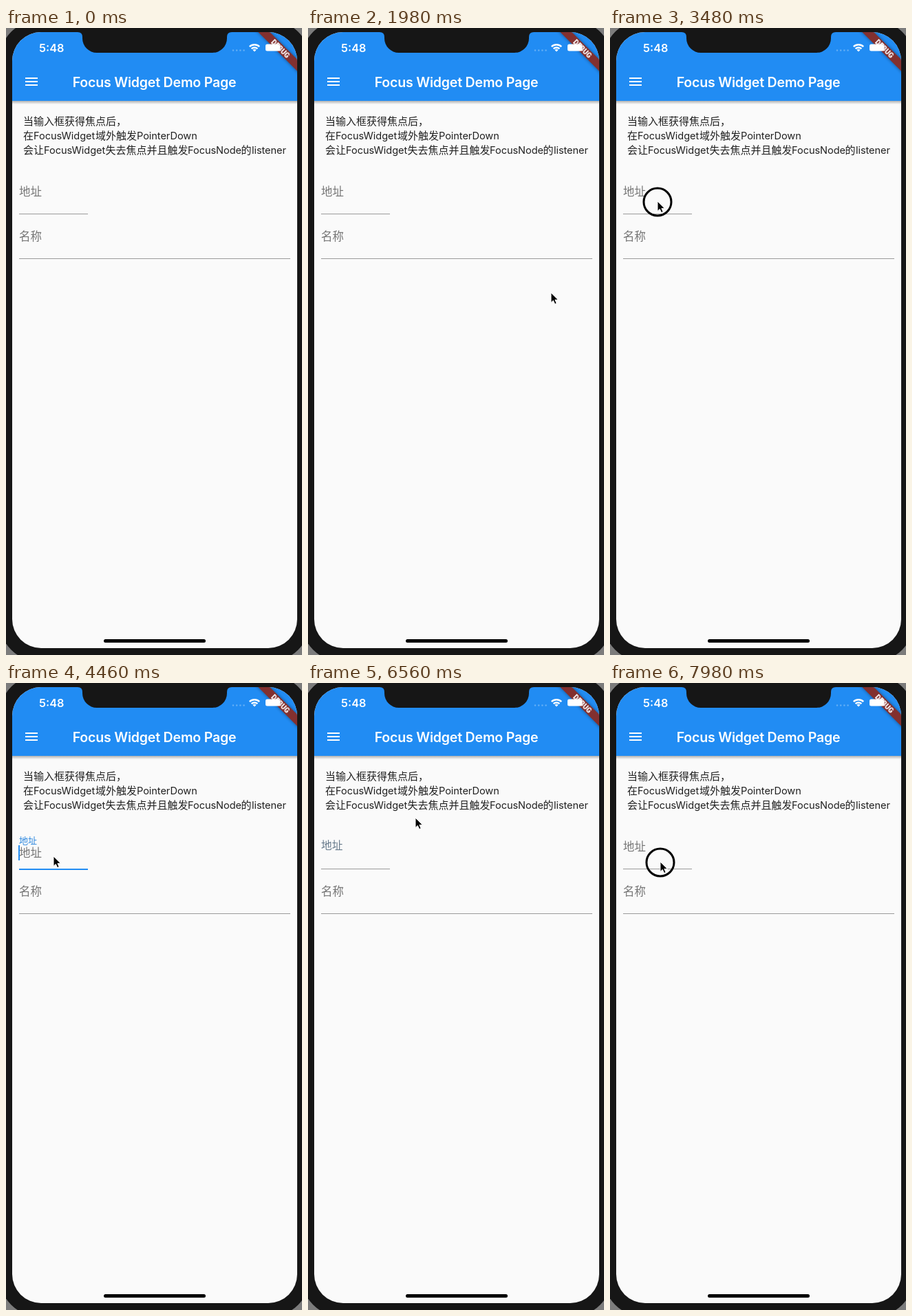
Animation of 430 by 912 pixels, one loop 8000 ms. Source, as an HTML page:

```html
<!DOCTYPE html>
<html lang="zh-CN">
<head>
<meta charset="utf-8">
<title>Focus Widget Demo</title>
<style>
  html, body { margin: 0; width: 100%; height: 100%; overflow: hidden; background: #7c7c7c; }
  svg { display: block; width: 100%; height: 100%; }
  text { font: 15px "Noto Sans CJK SC", "Noto Sans CJK", sans-serif; fill: #212121; }
  .latin { font: 14.6px Inter, sans-serif; letter-spacing: -.08px; }
  .title { font: 600 19.6px Inter, sans-serif; letter-spacing: -.23px; fill: #fff; }
  .clock { font: 600 16.3px Inter, sans-serif; fill: #fff; }
  .debug { font: 900 10px Roboto, sans-serif; fill: #fff; letter-spacing: .2px; }
  .field { font-size: 16.5px; fill: #757575; }
  #caret, #hint, #focusLine, #ring { opacity: 0; }
</style>
</head>
<body>
<svg viewBox="0 0 430 912">
  <defs>
    <clipPath id="screen"><rect x="9" y="6" width="414" height="896" rx="42"/></clipPath>
    <linearGradient id="shade" x2="0" y2="1">
      <stop stop-color="#444" stop-opacity=".4"/>
      <stop offset="1" stop-color="#444" stop-opacity="0"/>
    </linearGradient>
    <filter id="blur" x="-20%" y="-80%" width="140%" height="260%"><feGaussianBlur stdDeviation="2.5"/></filter>
  </defs>

  <rect x="-10" y="-12" width="452" height="934" rx="60" fill="#161616"/>

  <g clip-path="url(#screen)">
    <path fill="#fafafa" d="M9 6H423V902H9Z"/>
    <path fill="url(#shade)" d="M9 106H423V111H9Z"/>
    <path fill="#218cf3" d="M9 6H423V106H9Z"/>

    <path stroke="#fff" stroke-width="2" d="M28 73H46M28 78H46M28 83H46"/>
    <text class="title" x="215.5" y="85.5" text-anchor="middle">Focus Widget Demo Page</text>

    <text x="25" y="140.5">当输入框获得焦点后，</text>
    <text y="161.5"><tspan x="25">在</tspan><tspan class="latin" x="40">FocusWidget</tspan><tspan x="130">域外触发</tspan><tspan class="latin" x="190">PointerDown</tspan></text>
    <text y="182.5"><tspan x="25">会让</tspan><tspan class="latin" x="55">FocusWidget</tspan><tspan x="144.5">失去焦点并且触发</tspan><tspan class="latin" x="264">FocusNode</tspan><tspan x="341.5">的</tspan><tspan class="latin" x="357">listener</tspan></text>

    <path id="idleLine" stroke="#9a9a9a" d="M19 270.5H119"/>
    <path id="focusLine" stroke="#218cf3" stroke-width="2" d="M19 271H119"/>
    <text id="hint" class="field" x="19" y="253.3">地址</text>
    <text id="label" class="field">地址</text>
    <path id="caret" stroke="#218cf3" stroke-width="2" d="M19 236V258"/>

    <text class="field" x="19" y="309.3">名称</text>
    <path stroke="#9a9a9a" d="M19 335.5H413"/>

    <g transform="translate(423 6) rotate(45)">
      <rect x="-48" y="28" width="96" height="12" fill="#000" opacity=".45" filter="url(#blur)"/>
      <rect x="-48" y="28" width="96" height="12" fill="#82302f"/>
      <text class="debug" y="37.6" text-anchor="middle">DEBUG</text>
    </g>

    <text class="clock" x="48" y="34.6">5:48</text>
    <path stroke="#62aef6" stroke-width="2.6" stroke-linecap="round" stroke-dasharray="0 5.2" d="M330 32.5H347"/>
    <g fill="none" stroke="#fff" stroke-width="2.4">
      <path d="M353.8 27.2A10.4 10.4 0 0 1 368.2 27.2"/>
      <path d="M356.6 30.2A6.4 6.4 0 0 1 365.4 30.2"/>
      <path fill="#fff" stroke="none" d="M358.4 31.8A3.9 3.9 0 0 1 363.6 31.8L361 34.6Z"/>
    </g>
    <rect x="377" y="23.5" width="21" height="10" rx="2.5" fill="#fff"/>

    <rect x="142" y="889" width="148" height="5" rx="2.5"/>
  </g>

  <path fill="#161616" d="M104 5V6Q111 6 111 13V15A21 21 0 0 0 132 36H300A21 21 0 0 0 321 15V13Q321 6 328 6V5Z"/>

  <g id="pointer">
    <circle id="ring" cy="1" r="20" fill="none" stroke="#000" stroke-width="3"/>
    <path stroke="#fff" stroke-linejoin="round" d="M0 0V14.4L3.3 11.4 5.7 16.6 8.2 15.5 5.9 10.4H10.4Z"/>
  </g>
</svg>
<script>
const LOOP = 8000;
const FOCUS = 4180, BLUR = 6290, FLOAT = 500;
const MATERIAL = 'cubic-bezier(.4,0,.2,1)';

// Each step is [time in ms, properties, easing towards the next step]; the first is at 0.
function play(id, steps) {
  const [, lastProps] = steps[steps.length - 1];
  document.getElementById(id).animate(
    [...steps, [LOOP, lastProps]].map(
      ([ms, props, easing = 'linear']) => ({ offset: ms / LOOP, easing, ...props })),
    { duration: LOOP, iterations: Infinity });
}

const at = (x, y) => ({ transform: `translate(${x}px, ${y}px)` });
const fade = (id, steps) =>
  play(id, steps.map(([ms, opacity, easing]) => [ms, { opacity }, easing]));

play('pointer', [
  [0, at(446, 500)],
  [350, at(446, 500), 'ease-out'],
  [900, at(384, 405), 'ease-out'],
  [1660, at(356, 396)],
  [1980, at(353, 385)],
  [2350, at(353, 385), 'ease-in-out'],
  [3200, at(69, 252)],
  [5050, at(69, 252), 'ease-in-out'],
  [5750, at(154, 201)],
  [6250, at(154, 201)],
  [6500, at(156, 196)],
  [6760, at(156, 196), 'ease-in-out'],
  [7640, at(73, 260)],
]);

const hold = 'step-end';
fade('ring', [
  [0, 0, hold], [3400, 1, hold], [3940, 0, hold],
  [5860, 1, hold], [6340, 0, hold], [7860, 1, hold],
]);

const rest = { transform: 'translate(19px, 244.3px) scale(1)', fill: '#757575' };
const floated = { transform: 'translate(19px, 231.7px) scale(.75)', fill: '#218cf3' };
play('label', [
  [0, rest], [FOCUS, rest, MATERIAL], [FOCUS + FLOAT, floated],
  [BLUR, floated, MATERIAL], [BLUR + FLOAT, rest],
]);

const shown = [[0, 0], [FOCUS, 0], [FOCUS + 220, 1], [BLUR, 1], [BLUR + 220, 0]];
fade('hint', shown);
fade('focusLine', shown);
fade('idleLine', shown.map(([ms, value]) => [ms, 1 - value]));

fade('caret', [
  [0, 0, hold], [FOCUS + 60, 1], [4980, 1], [5260, 0], [5640, 0],
  [5980, 1], [BLUR, 1, hold], [BLUR + 20, 0],
]);
</script>
</body>
</html>
```
